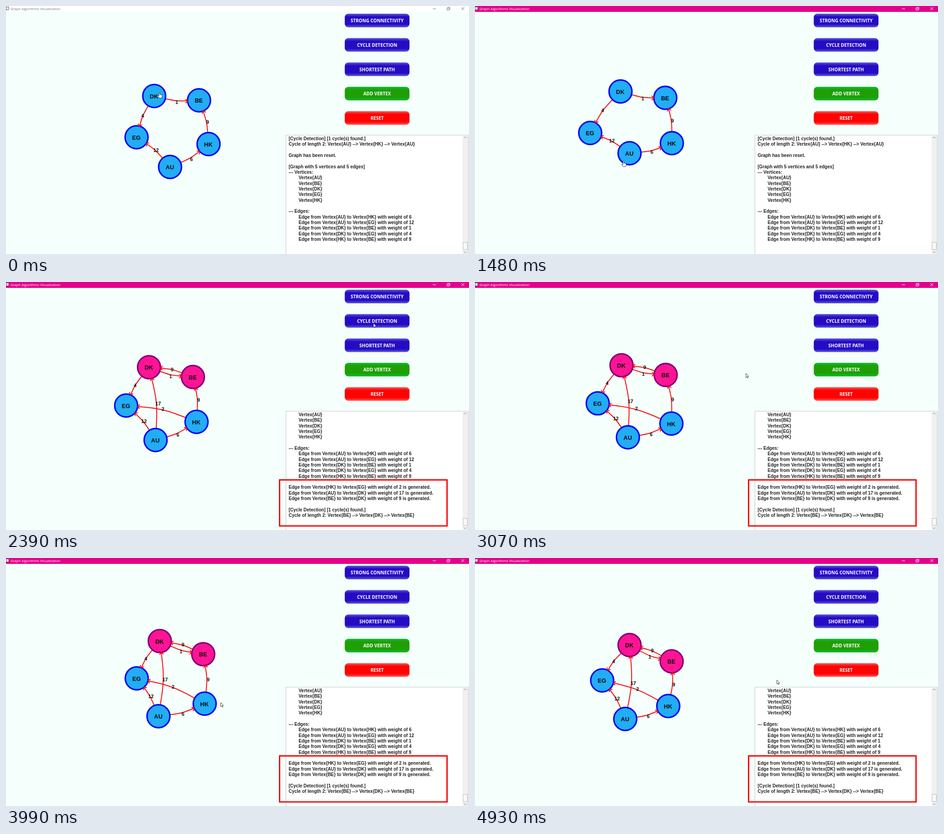
Animation, 1023 px wide and 547 px high, one loop 4950 ms. Source, as an HTML page with a canvas:

```html
<!DOCTYPE html>
<html>
<head>
<meta charset="utf-8">
<title>Graph Algorithms Visualization</title>
<style>
html, body { margin: 0; width: 100%; height: 100%; overflow: hidden; background: #f5fffc; }
canvas { display: block; }
</style>
</head>
<body>
<canvas id="stage" width="1023" height="547"></canvas>
<script>
const ctx = document.getElementById('stage').getContext('2d');
const LOOP = 4950, ACTIVE = 210, LINKED = 1900, FOUND = 2290;
const SANS = '"Liberation Sans", Arial, sans-serif', UI = '"Open Sans", "Noto Sans", sans-serif';
const R = 25.3;

const names = ['DK', 'BE', 'EG', 'HK', 'AU'];
// time, then x, y of each vertex in the order of names
const poses = [
  [210, 327.5, 198.5, 426.5, 208, 288.5, 289.5, 447.5, 304.5, 362.5, 355],
  [820, 345.5, 161.5, 436.5, 199, 297, 249.5, 450.5, 295.5, 354.5, 329],
  [1280, 339, 167, 431, 199, 278, 261, 446, 297, 350, 330],
  [1400, 328, 182, 424, 201, 240, 281, 438, 301, 345, 327],
  [1480, 321.5, 188.5, 420.5, 202.5, 254.5, 280, 435, 302.5, 341.5, 324.5],
  [1600, 318, 191, 416, 206, 260, 278, 428, 306, 335, 357],
  [2390, 316, 188, 413, 209.5, 265.5, 272.5, 421, 308.5, 330.5, 348.5],
  [2870, 318, 186, 416, 207, 266, 271, 425, 309, 333, 347],
  [3590, 338.5, 177.5, 435, 200, 284.5, 259, 457, 320.5, 350.5, 331],
  [4370, 341, 188.5, 436.5, 223.5, 293, 271.5, 422, 322, 324, 366],
  [4930, 341.5, 192, 434.5, 228, 281, 270, 427, 326.5, 332, 355]
];
const mouse = [
  [210, 339, 190], [560, 352, 154], [820, 424, 190], [1150, 285, 255], [1400, 239, 278],
  [1480, 328, 341], [1600, 329, 371], [1790, 637, 320], [2000, 838, 207], [2150, 822, 152],
  [2290, 812, 91], [2400, 812, 91], [2870, 682, 150], [3430, 450, 294], [3590, 454, 307],
  [3950, 454, 311], [4100, 529, 340], [4220, 325, 368], [4370, 316, 391], [4510, 340, 376],
  [4930, 667, 269]
];
const edges = [
  ['AU', 'HK', 6], ['AU', 'EG', 12], ['DK', 'BE', 1], ['DK', 'EG', 4], ['HK', 'BE', 9],
  ['HK', 'EG', 2], ['AU', 'DK', 17], ['BE', 'DK', 9]
];
const buttons = [
  ['STRONG CONNECTIVITY', '#260bc4', '#5a5cd8'], ['CYCLE DETECTION', '#260bc4', '#5a5cd8'],
  ['SHORTEST PATH', '#260bc4', '#5a5cd8'], ['ADD VERTEX', '#1f9f04', '#08bf38'],
  ['RESET', '#ff0202', '#ff5a5a']
];

const v = n => `Vertex{${n}}`;
const link = ([a, b, w]) => `Edge from ${v(a)} to ${v(b)} with weight of ${w}`;
const cycle = (...ns) => ['[Cycle Detection] [1 cycle(s) found.]', 'Cycle of length 2: ' + ns.map(v).join(' --> ')];
const log = [
  ...cycle('AU', 'HK', 'AU'), '', 'Graph has been reset.', '',
  '[Graph with 5 vertices and 5 edges]', '--- Vertices:', ...[...names].sort().map(n => '\t' + v(n)), '',
  '--- Edges:', ...edges.slice(0, 5).map(e => '\t' + link(e)), '',
  ...edges.slice(5).map(e => link(e) + ' is generated.'), '', ...cycle('BE', 'DK', 'BE')
];

function at(keys, t) {
  let i = keys.findIndex(k => k[0] > t);
  if (i < 0) return keys[keys.length - 1].slice(1);
  if (i === 0) return keys[0].slice(1);
  const a = keys[i - 1], b = keys[i], f = (t - a[0]) / (b[0] - a[0]);
  return a.slice(1).map((x, j) => x + (b[j + 1] - x) * f);
}

function text(s, x, y, font, color, align = 'left') {
  ctx.font = font;
  ctx.fillStyle = color;
  ctx.textAlign = align;
  ctx.fillText(s, x, y);
}

function rect(x, y, w, h, fill) {
  ctx.fillStyle = fill;
  ctx.fillRect(x, y, w, h);
}

function path(points, color, width) {
  ctx.beginPath();
  points.forEach(([x, y]) => ctx.lineTo(x, y));
  ctx.strokeStyle = color;
  ctx.lineWidth = width;
  ctx.stroke();
}

function titleBar(active) {
  const ink = active ? '#fff' : '#777';
  rect(0, 0, 1023, 13, active ? '#e4008b' : '#fff');
  rect(0, 1.5, 6.5, 7.5, '#555');
  rect(1, 2.5, 4.5, 5.5, '#fff');
  text('Graph Algorithms Visualization', 10, 8.8, '7.7px ' + UI, ink);
  path([[943, 6], [950, 6]], ink, 1);
  ctx.strokeRect(974.5, 4.5, 4.5, 4.5);
  path([[976, 4], [976, 2.8], [981, 2.8], [981, 7.5], [979.5, 7.5]], ink, 0.8);
  path([[1006, 2.5], [1012.5, 9]], ink, 1);
  path([[1012.5, 2.5], [1006, 9]], ink, 1);
}

function button([label, mid, rim], i) {
  const y = 17 + i * 53.75, g = ctx.createLinearGradient(0, y, 0, y + 30);
  g.addColorStop(0, rim);
  g.addColorStop(0.22, mid);
  g.addColorStop(0.78, mid);
  g.addColorStop(1, rim);
  ctx.fillStyle = g;
  ctx.beginPath();
  ctx.roundRect(748.5, y, 143, 30, 8);
  ctx.fill();
  text(label, 820, y + 19, 'bold 10px ' + UI, '#fff', 'center');
}

function consolePane(t) {
  rect(618, 284.5, 404, 270, '#c4c8c6');
  rect(619, 285.5, 402, 270, '#fff');
  rect(1009, 285.5, 12, 270, '#f0f0f0');
  rect(1009.5, 521, 10.5, 16.5, '#bbb');
  rect(1010.5, 522, 8.5, 14.5, '#f8f8f8');
  path([[1011.5, 291.5], [1014.5, 288.5], [1017.5, 291.5]], '#777', 1);
  path([[1011.5, 541.5], [1014.5, 544.5], [1017.5, 541.5]], '#777', 1);
  const top = t < LINKED ? 0 : t < FOUND ? 4 : 7;
  log.slice(top, top + 19).forEach((s, i) =>
    text(s.trim(), s[0] === '\t' ? 646.5 : 624.5, 296 + i * 12.34, 'bold 10px ' + SANS, '#222'));
  if (t >= FOUND) {
    ctx.strokeStyle = '#f80a0a';
    ctx.lineWidth = 3;
    ctx.strokeRect(604.5, 436.5, 370, 101.5);
  }
}

// Edges bow to the right of their direction of travel.
function edge([from, to, weight], pos) {
  const [ax, ay] = pos[from], [bx, by] = pos[to];
  const dx = bx - ax, dy = by - ay, d = Math.hypot(dx, dy);
  const bow = Math.sin((9.5 - d * 0.006) * Math.PI / 180) / 2;
  const cx = (ax + bx) / 2 - dy * bow, cy = (ay + by) / 2 + dx * bow;
  ctx.beginPath();
  ctx.moveTo(ax, ay);
  ctx.bezierCurveTo(cx, cy, cx, cy, bx, by);
  ctx.strokeStyle = '#fa0c0c';
  ctx.lineWidth = 2;
  ctx.stroke();
  const a = Math.atan2(by - cy, bx - cx);
  const tip = [bx - R * Math.cos(a), by - R * Math.sin(a)];
  const wing = s => [tip[0] - 6.5 * Math.cos(a + s), tip[1] - 6.5 * Math.sin(a + s)];
  return { head: [wing(0.78), tip, wing(-0.78)], label: [weight, cx + 1, cy + 5.3] };
}

function vertex(name, [x, y], marked) {
  ctx.beginPath();
  ctx.arc(x, y, R, 0, 7);
  ctx.fillStyle = marked ? '#ff1493' : '#22adf6';
  ctx.strokeStyle = marked ? '#800080' : '#0606f2';
  ctx.lineWidth = 3.3;
  ctx.fill();
  ctx.stroke();
  text(name, x - 0.5, y + 5.4, 'bold 13px ' + SANS, '#0a0a14', 'center');
}

const hand = new Path2D('M-1 1Q0-.8 1 1V5L5 6Q6.5 6.5 6 9L5 13H-.5L-4 8.5Q-4 7-2.5 7.5L-1 9Z');
const arrow = new Path2D('M0 0V9L2 7.2 3.5 10.3 4.8 9.7 3.4 6.6H6.2Z');

function cursor(t, x, y, over) {
  ctx.save();
  ctx.translate(x, y);
  if (t >= 3480 && t < 3950) {
    ctx.fillStyle = '#a9b85c';
    ctx.strokeStyle = '#d9cf72';
    ctx.lineWidth = 1;
    ctx.beginPath();
    ctx.arc(0, 0, 8, 0, 7);
    ctx.fill();
    for (const r of [2.5, 5, 7.5]) {
      ctx.beginPath();
      ctx.arc(0, 0, r, 0, 7);
      ctx.stroke();
    }
  } else {
    const shape = over ? hand : arrow;
    ctx.fillStyle = '#fff';
    ctx.strokeStyle = '#333';
    ctx.lineWidth = 0.9;
    ctx.fill(shape);
    ctx.stroke(shape);
  }
  ctx.restore();
}

function draw(t) {
  rect(0, 0, 1023, 547, '#f5fffc');
  titleBar(t >= ACTIVE);
  buttons.forEach(button);
  consolePane(t);

  const p = at(poses, t), pos = {};
  names.forEach((n, i) => pos[n] = [p[2 * i], p[2 * i + 1]]);
  const parts = edges.slice(0, t < LINKED ? 5 : 8).map(e => edge(e, pos));
  names.forEach((n, i) => vertex(n, pos[n], t >= FOUND && i < 2));
  parts.forEach(({ head, label: [s, x, y] }) => {
    path(head, '#fa0c0c', 2);
    text(s, x, y, 'bold 11px ' + SANS, '#111', 'center');
  });

  const [x, y] = at(mouse, t);
  cursor(t, x, y, names.some(n => Math.hypot(pos[n][0] - x, pos[n][1] - y) < 25));
}

const start = performance.now();
function tick() {
  draw((performance.now() - start) % LOOP);
  requestAnimationFrame(tick);
}
tick();
</script>
</body>
</html>
```
